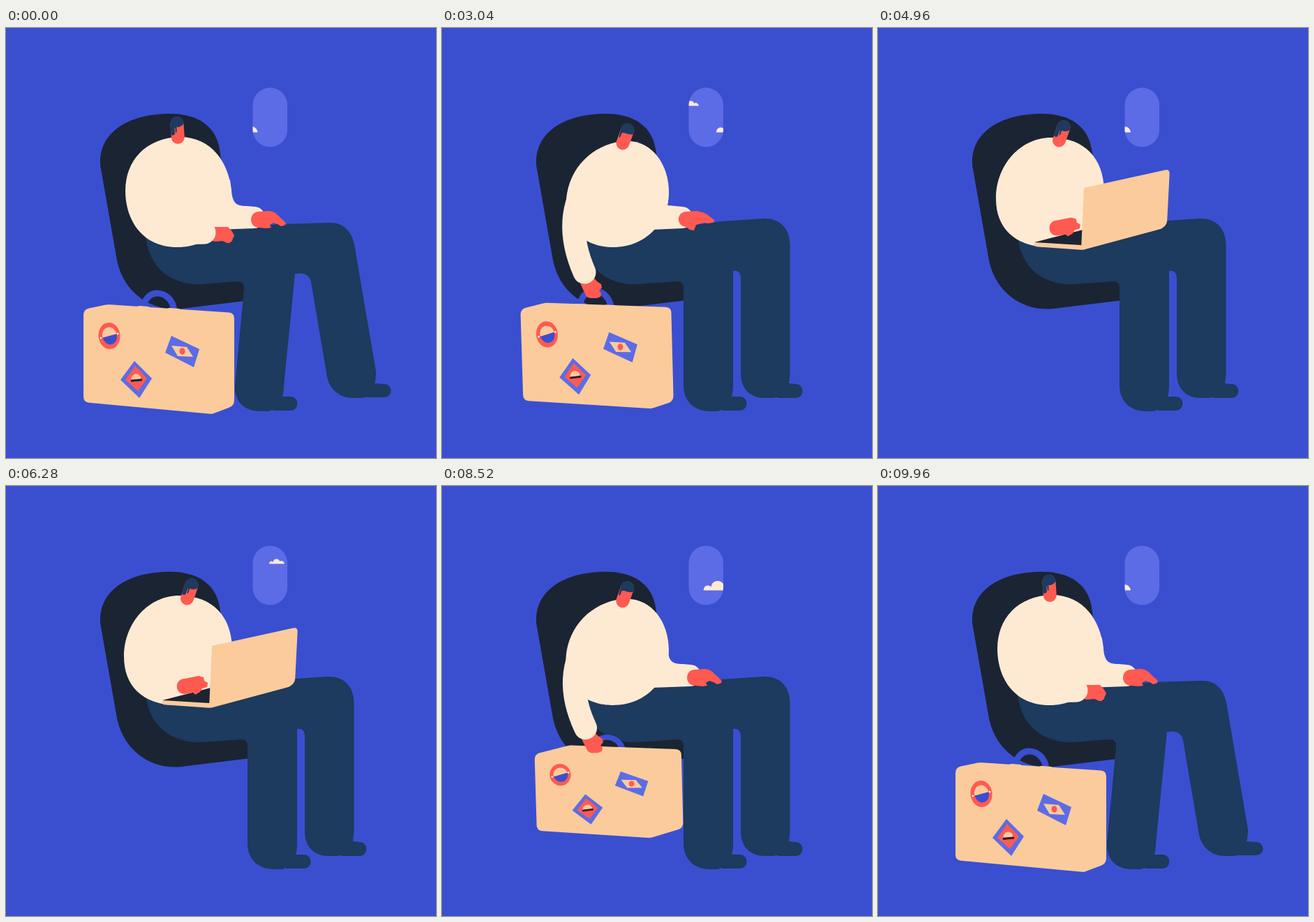
An HTML page with a canvas for the animation above (10 s loop, 616x616 px).

```html
<!DOCTYPE html>
<html lang="en">
<head>
<meta charset="utf-8">
<title>Window seat</title>
<style>
html, body { margin: 0; width: 100%; height: 100%; overflow: hidden; background: #3a4fd0; }
canvas { display: block; width: 616px; height: 616px; }
</style>
</head>
<body>
<canvas id="stage" width="616" height="616"></canvas>
<script>
const ctx = document.getElementById('stage').getContext('2d');
const BLUE = '#3a4fd0', SKY = '#5c6ce6', DARK = '#1b2433', NAVY = '#1d3a5f',
      RED = '#ff5a52', TAN = '#fbcb9c', CREAM = '#feead3';

// Blending: numbers, arrays and path strings of equal structure
const lerp = (a, b, k) => a + (b - a) * k;
const mixList = (a, b, k) => a.map((v, i) => Array.isArray(v) ? mixList(v, b[i], k) : lerp(v, b[i], k));
const NUM = /-?\d+(\.\d+)?/g;
function mixPath(a, b, k) {
  const to = b.match(NUM);
  let i = 0;
  return a.replace(NUM, n => lerp(+n, +to[i++], k).toFixed(2));
}
function blend(mix, list, p) {
  const i = Math.min(Math.floor(p), list.length - 2);
  return mix(list[i], list[i + 1], p - i);
}
const ease = u => u < .5 ? 4 * u ** 3 : 1 - 4 * (1 - u) ** 3;
function track(t, keys) {
  if (t <= keys[0][0]) return keys[0][1];
  for (let i = 1; i < keys.length; i++) {
    const [t0, a] = keys[i - 1], [t1, b] = keys[i];
    if (t < t1) return lerp(a, b, ease((t - t0) / (t1 - t0)));
  }
  return keys[keys.length - 1][1];
}

// Drawing
function fill(path, color) {
  ctx.fillStyle = color;
  ctx.fill(new Path2D(path));
}
function stroke(path, color, width, cap = 'butt') {
  ctx.strokeStyle = color;
  ctx.lineWidth = width;
  ctx.lineCap = cap;
  ctx.stroke(new Path2D(path));
}
function oval(x, y, rx, ry, color, turn = 0, from = 0, to = 2 * Math.PI) {
  ctx.fillStyle = color;
  ctx.beginPath();
  ctx.ellipse(x, y, rx, ry, turn, from, to);
  ctx.fill();
}
function pill(x, y, w, h, color) {
  ctx.fillStyle = color;
  ctx.beginPath();
  ctx.roundRect(x, y, w, h, Math.min(w, h) / 2);
  ctx.fill();
}
// Corner radii repeat around the polygon
function softPoly(pts, radii, color) {
  const n = pts.length;
  const toward = (p, q, r) => {
    const d = Math.hypot(q[0] - p[0], q[1] - p[1]) || 1;
    return mixList(p, q, Math.min(r / d, .45));
  };
  ctx.fillStyle = color;
  ctx.beginPath();
  pts.forEach((p, i) => {
    const r = radii[i % radii.length];
    ctx.lineTo(...toward(p, pts[(i + n - 1) % n], r));
    ctx.quadraticCurveTo(...p, ...toward(p, pts[(i + 1) % n], r));
  });
  ctx.fill();
}
function placed(x, y, deg, draw) {
  ctx.save();
  ctx.translate(x, y);
  ctx.rotate(deg * Math.PI / 180);
  draw();
  ctx.restore();
}

const SEAT = 'M350,390L252,402C210,407 169,381 159,333L136,202C129,158 164,129 215,124C266,118 303,135 307,180L318,300L350,340Z';
const CLOUD = 'M0,0C0,-7 7,-9 11,-5C12,-16 27,-16 29,-7C36,-11 42,-5 42,0Z';

// Stretched legs, then bent legs
const LEGS = [
  'M200,298C205,350 245,369 280,367L333,363Q341,363 341,373L328,512C327,535 341,548 362,549L377,549Q381,546 384,548L407,548C421,548 421,528 407,528L396,528Q398,522 398,512L414,352Q434,349 437,364L460,500C464,518 478,530 497,530L511,530Q515,528 518,529L541,529C555,529 555,510 541,510L528,509Q530,503 530,492L499,310C495,290 482,278 463,279L390,281L300,290L200,290Z',
  'M200,298C205,350 245,369 280,367L338,363Q346,363 346,373L346,512C346,535 362,549 383,549L396,549Q399,546 402,548L426,548C440,548 440,528 426,528L415,528Q417,522 417,512L417,348Q428,346 428,360L428,495C428,518 443,530 462,530L476,530Q479,528 482,530L506,530C520,530 520,510 506,510L497,509Q498,503 498.5,494L498.5,310C498,285 482,272 460,273L400,277L300,290L200,290Z'
];

// Poses: resting, reaching down, hands on lap
const TORSO = [
  'M171,233C171,190 200,157 250,156C295,157 318,192 323,232C326,272 300,314 245,314C195,314 171,275 171,233Z',
  'M178,245C182,200 215,168 258,162C300,158 325,195 325,235C325,275 295,314 245,314C222,314 178,305 178,245Z',
  'M169,245C169,195 205,157 248,157C297,157 323,188 324,232C326,275 300,314 245,314C195,314 169,285 169,245Z'
];
const ARM = ['M205,225Q210,298 284,293', 'M212,215Q170,272 204,350', 'M205,225Q185,288 235,286'];
const HAND = [
  'M-4,-10L18,-10L22,-6L26,0L27,3L25,6L24,10L20,13L17,13L10,10L0,11C-12,11 -12,-10 -4,-10Z',
  'M8,-6L14,1L20,5L21,10L17,14L20,18L19,23L14,25L4,25L-1,23L-9,6C-12,0 0,-10 8,-6Z',
  'M0,-11L20,-15L27,-13L28,-8L33,-5L32,1L25,3L22,8L15,12L12,9L0,11C-15,11 -15,-11 0,-11Z'
];
const HAND_AT = [[300, 295], [208, 362], [237, 287]];
const HEAD_AT = [[246.3, 156.5, -4], [259, 165, 20], [255, 160, 15]];
const HAIR = [
  'M-9.5,-20C-9.5,-33 9.5,-33 9.5,-20L9.5,-19Q5,-14 -1,-14.5L-1,-8Q-2,-6 -3,-8L-3,-13L-4,-14L-4,-5Q-6,-2 -9.5,-4Z',
  'M-9.5,-20C-9.5,-33 9.5,-33 9.5,-20L9.5,-17Q4,-14 -4,-14.5L-5,-14Q-5,-14 -5.5,-14L-6,-14L-6,-14L-6.5,-7Q-7,-5 -8.5,-7Z'
];
const FAR_ARM = [
  'M300,200L321,218C324,250 326,255 345,255L356,256C376,257 376,286 356,287L300,289Z',
  'M300,200L324,230C325,240 324,250 323,254L344,256C364,257 364,286 344,287L300,289Z'
];
const FAR_HAND = [
  'M363,263L376,262Q386,263 390,269L400,278Q402,282 398,283L394,284L389,281L383,279L378,282L380,286L373,287L363,286C347,286 347,263 363,263Z',
  'M351,263L365,262Q376,264 381,268L390,275Q391,279 387,279L381,280L377,279L371,280L364,282L361,290L355,289L350,285C335,284 335,263 351,263Z'
];

// Luggage outlines, clockwise from the upper left
const CASE = [[111, 403], [146, 396], [327, 408], [327, 541], [295, 553], [111, 536]];
const LEAN = [[112, 403], [147, 394], [328, 400.5], [331.5, 535.5], [300, 546], [116, 534.5]];
const SLAB = [[224, 301], [340, 271], [408, 274], [408, 287], [293, 318], [224, 313]];
const BASE = [[224, 307], [340, 277], [408, 280], [408, 287], [293, 318], [224, 313]];

function stickers() {
  oval(148, 441, 15.5, 19, RED, -.12);
  oval(148.5, 441, 10.5, 12.5, TAN, -.27, Math.PI, 2 * Math.PI);
  oval(148.5, 441, 10.5, 12.5, BLUE, -.27, 0, Math.PI);
  oval(136, 444, 1.5, 1.5, CREAM);
  oval(160, 438, 1.5, 1.5, CREAM);
  fill('M237,441L277,460L269,486L228,465Z', SKY);
  fill('M237,455L259,457L268,471L246,470Z', TAN);
  oval(252.5, 463, 4, 4.8, RED);
  fill('M184,477L209,502L191,530L164,504Z', SKY);
  fill('M185,484L202,502L189,520L171,504Z', RED);
  oval(186.5, 503, 7, 7.5, TAN, -.07, Math.PI, 2 * Math.PI);
  stroke('M179,505.5L195,504', DARK, 3);
}

function luggage(pts, dressed) {
  const [o, , r, , , b] = pts;
  const skew = 5 / (216 * 133);
  const [ux, uy, vx, vy] = [r[0] - o[0], r[1] - o[1], b[0] - o[0], b[1] - o[1]];
  const onFace = draw => {
    if (!dressed) return;
    ctx.save();
    ctx.transform(ux / 216 - vx * skew, uy / 216 - vy * skew, vx / 133, vy / 133, o[0], o[1]);
    ctx.translate(-111, -403);
    draw();
    ctx.restore();
  };
  onFace(() => {
    stroke('M197,401C199,372 237,373 241,405', BLUE, 9);
    stroke('M191,401L203,402M234,404L247,405', TAN, 6, 'round');
  });
  softPoly(pts, [8, 3, 8], TAN);
  onFace(stickers);
}

function lid(open) {
  const c = Math.cos(open * Math.PI / 2), s = Math.sin(open * Math.PI / 2);
  const a = [291 - 67 * c + 4 * s, 318 - 17 * c - 89 * s];
  const b = [408 - 68 * c + 10 * s, 287 - 16 * c - 85 * s];
  softPoly([a, b, [408 + 6 * s, 274 + 6 * s], [408, 287], [291, 318], [a[0], a[1] + 7 * c]], [7, 7, 4], TAN);
}

function sky(t) {
  pill(353.5, 85.5, 49.5, 85, SKY);
  ctx.save();
  ctx.beginPath();
  ctx.roundRect(353.5, 85.5, 49.5, 85, 24.75);
  ctx.clip();
  const cloud = (x, y, size) => {
    ctx.save();
    ctx.translate(x, y);
    ctx.scale(size, size);
    fill(CLOUD, CREAM);
    ctx.restore();
  };
  cloud(403 - 38 * ((t + 2.223) % 5), 149.5, 1);
  for (const start of [.3, 5.03]) cloud(403 - 20.8 * (t - start), 111.5, .52);
  ctx.restore();
}

function draw(t) {
  const pose = track(t, [[1.2, 0], [1.9, 1], [3.03, 1], [3.5, 2], [8.1, 2], [8.65, 1], [9, 1], [9.7, 0]]);
  const bend = track(t, [[2.15, 0], [2.9, 1], [8.95, 1], [9.6, 0]]);
  const lean = track(t, [[1.9, 0], [2.95, 1], [8.6, 1], [9.24, 0]]);
  const lift = track(t, [[3, 0], [3.45, 1], [8.2, 1], [8.7, 0]]);
  const open = track(t, [[4.2, 0], [4.9, 1], [7.3, 1], [7.96, .035], [8.06, 0]]);
  const slide = track(t, [[3.2, 0], [3.45, 36], [3.8, 0], [8.02, 0], [8.24, 36], [8.5, 0]]);
  const reach = track(t, [[1.9, 0], [2.9, 1], [3.1, 1], [3.5, 0]]);

  ctx.fillStyle = BLUE;
  ctx.fillRect(0, 0, 616, 616);
  sky(t);
  fill(SEAT, DARK);
  fill(mixPath(...LEGS, bend), NAVY);

  fill(mixPath(...FAR_ARM, reach), CREAM);
  fill(mixPath(...FAR_HAND, reach), RED);
  fill(blend(mixPath, TORSO, pose), CREAM);

  const [hx, hy, tilt] = blend(mixList, HEAD_AT, pose);
  placed(hx + 4.5 * open, hy + open, tilt + 4 * open, () => {
    pill(-9.5, -29.5, 19, 39, RED);
    fill(mixPath(...HAIR, 1 - Math.abs(pose - 1)), NAVY);
  });

  const onLap = lift === 1;
  const shape = mixList(mixList(CASE, LEAN, lean), SLAB, lift)
    .map(([x, y]) => [x + slide, y - slide * .3]);
  const arm = () => stroke(blend(mixPath, ARM, pose), CREAM, 33, 'round');
  const hand = () => {
    const [x, y] = blend(mixList, HAND_AT, pose);
    const tap = open === 1 ? Math.sin((t - 6.28) * 6 * Math.PI) : 0;
    placed(x + 19 * open + 3 * tap, y - 1.5 * Math.abs(tap), 0,
      () => fill(blend(mixPath, HAND, pose), RED));
  };

  if (lift < .6) luggage(shape, lift < .45);
  if (pose < 1.5) {
    hand();
    arm();
  } else {
    arm();
    if (onLap && open) {
      softPoly(BASE, [3], TAN);
      fill('M224,307L340,277L400,285L291,311Z', DARK);
    }
    hand();
  }
  if (onLap && open) lid(open);
  else if (lift >= .6) luggage(shape, false);
}

const began = performance.now();
function tick() {
  draw((performance.now() - began) / 1000 % 10);
  requestAnimationFrame(tick);
}
tick();
</script>
</body>
</html>
```
